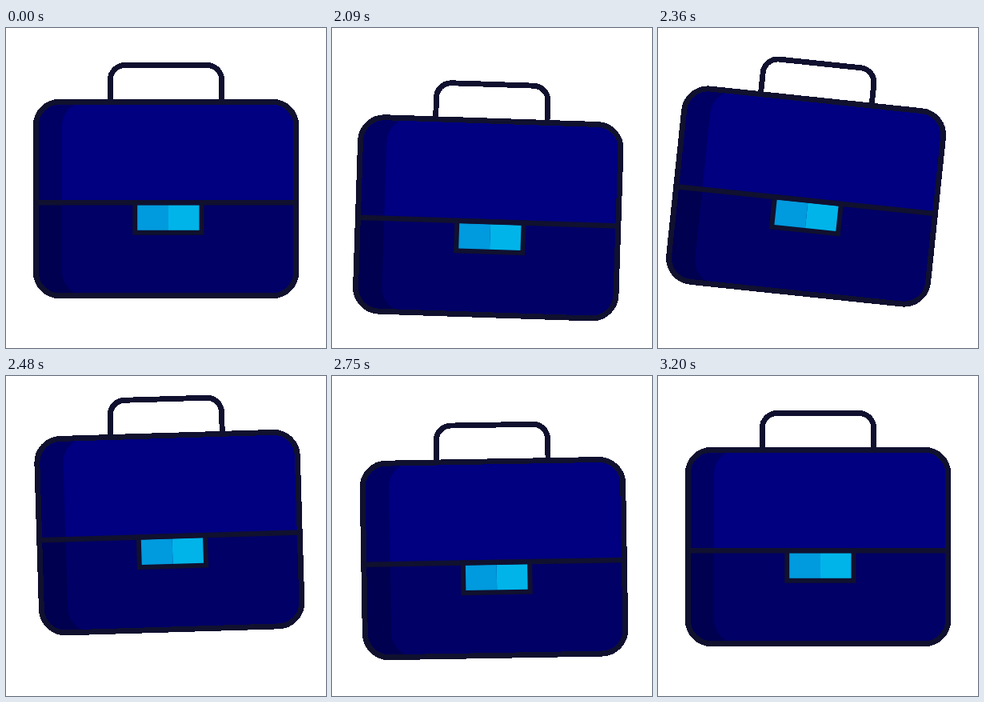
Write an HTML page that moves like this. It is 400 by 400 pixels and loops after 3230 ms.

```html
<!DOCTYPE html>
<html lang="en">
<head>
<meta charset="utf-8">
<title>Briefcase</title>
<style>
  html, body { margin: 0; height: 100%; overflow: hidden; background: #fff; }
  svg { display: block; width: 100%; height: 100%; }
  .crisp { shape-rendering: crispEdges; stroke-width: 6.9; }
</style>
</head>
<body>
<svg viewBox="0 0 400 400">
  <g id="briefcase" fill="none" stroke="#10102f" stroke-width="6.5">
    <path class="crisp" d="M130.3 92V65a18.5 18.5 0 0 1 18.5-18.5H251.2a18.5 18.5 0 0 1 18.5 18.5V92"/>
    <g stroke="none">
      <rect x="37.2" y="92.2" width="325.6" height="242.6" rx="30" fill="#000080"/>
      <path d="M37.2 218H362.8V304.8a30 30 0 0 1-30 30H67.2a30 30 0 0 1-30-30z" fill="#000066"/>
      <path d="M67.2 92.2a30 30 0 0 0-30 30V304.8a30 30 0 0 0 30 30H100a30 30 0 0 1-30-30V122.2a30 30 0 0 1 30-30z" fill="#000" fill-opacity=".22"/>
    </g>
    <rect class="crisp" x="37.2" y="92.2" width="325.6" height="242.6" rx="30"/>
    <path d="M161 218.5H203V256H161z" fill="#009ade" stroke="none"/>
    <path d="M203 218.5H244.5V256H203z" fill="#00b4ea" stroke="none"/>
    <path d="M37.2 218.2H362.8"/>
    <rect x="161.2" y="218.2" width="83.3" height="37.6" stroke-width="6"/>
  </g>
</svg>
<script>
  const LOOP = 3230, START = 2000, STEP = 30;

  // Keys are [step, value]; each stretch eases in and out.
  const ANGLE = [[0, 0], [8.8, 7], [10.4, 7], [20, -7], [30, 5], [40, 0]];
  const DROP = [[0, 0], [5.3, 40], [15.5, -18], [26, 15.5], [36, 0]];

  const briefcase = document.getElementById('briefcase');

  function valueAt(keys, step) {
    const next = keys.findIndex(([at]) => at > step);
    if (next < 0) return keys[keys.length - 1][1];
    const [from, a] = keys[next - 1], [to, b] = keys[next];
    const t = (step - from) / (to - from);
    return a + (b - a) * t * t * (3 - 2 * t);
  }

  const origin = performance.now();

  function draw(now) {
    const time = Math.max(0, now - origin) % LOOP;
    const step = Math.max(0, Math.floor((time - START) / STEP));
    briefcase.setAttribute('transform',
      `translate(0 ${valueAt(DROP, step)}) rotate(${valueAt(ANGLE, step)} 200 70)`);
    requestAnimationFrame(draw);
  }
  draw(origin);
</script>
</body>
</html>
```
